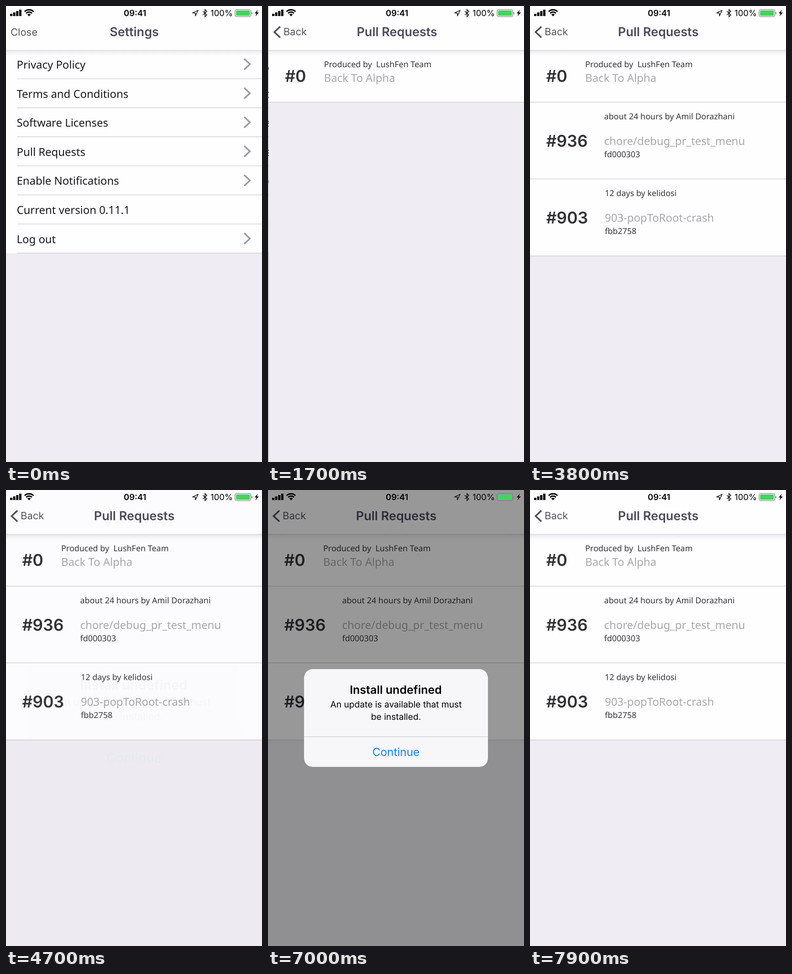
Recreate the animation shown at these times as an HTML page. Size 561 by 998 pixels, loop 8 s.

```html
<!DOCTYPE html>
<html lang="en">
<head>
<meta charset="utf-8">
<title>Settings to pull requests</title>
<style>
html, body { margin: 0; width: 100%; height: 100%; overflow: hidden; background: #efedf3; }
svg { display: block; }
text { font-family: "Noto Sans", sans-serif; white-space: pre; text-rendering: geometricPrecision; }
.ui { font-family: Inter, sans-serif; }
.bold { font-weight: 600; }
.mid { text-anchor: middle; }
.title { font-size: 27px; fill: #4b4a5c; }
.nav { font-size: 22px; fill: #55545f; }
.item { font-size: 23.9px; fill: #19181a; }
.number { font-size: 35.5px; fill: #333136; }
.meta { font-size: 17.95px; fill: #353437; }
.branch { font-size: 23.9px; fill: #a9a8ab; }
.status { font-size: 18.4px; }
.line { stroke: #d2d1d5; stroke-width: 1.4; }
.chevron { fill: none; stroke: #9d9ca1; stroke-width: 3.6; }
</style>
</head>
<body>
<svg width="561" height="998" viewBox="0 0 561 998">
  <defs>
    <linearGradient id="below" x2="0" y2="1">
      <stop stop-opacity=".11"/><stop offset=".4" stop-opacity=".045"/><stop offset="1" stop-opacity="0"/>
    </linearGradient>
    <linearGradient id="beside">
      <stop stop-opacity="0"/><stop offset="1" stop-opacity=".2"/>
    </linearGradient>
  </defs>

  <g id="settings"></g>
  <rect id="shade" width="561" height="998"/>

  <g id="pulls">
    <rect x="-11" width="11" height="998" fill="url(#beside)"/>
    <rect width="561" height="998" fill="#fdfdfe"/>
    <g id="content"></g>
  </g>

  <rect id="dim" width="561" height="998"/>

  <g id="alert">
    <rect x="79" y="392" width="403" height="214" rx="19" fill="#f7f6f9"/>
    <path d="M79 540H482" stroke="#d3d2d7" stroke-width="1.3"/>
    <g id="message" class="mid">
      <text class="ui bold" x="280" y="446" font-size="25">Install undefined</text>
      <text class="ui" x="280.5" y="476" font-size="19.2">An update is available that must</text>
      <text class="ui" x="280.5" y="503" font-size="19.2">be installed.</text>
      <text class="ui" x="280.5" y="582" font-size="24.3" fill="#0f7ff5">Continue</text>
    </g>
  </g>

  <g id="statusbar">
    <path d="M9 17h5v5h-5zM15.6 14h5v8h-5zM22.2 11h5v11h-5zM28.8 8h5v14h-5z"/>
    <path d="M50.5 22.5L46.6 18.6A5.5 5.5 0 0 1 54.4 18.6Z"/>
    <path d="M44.2 15.9A9 9 0 0 1 56.8 15.9M40.8 12.3A13.8 13.8 0 0 1 60.2 12.3" fill="none" stroke="#000" stroke-width="3"/>
    <text class="ui bold mid status" x="282.7" y="22">09:41</text>
    <path d="M421 9.3L409 15.2L414.8 15.6L415.2 21.6Z" fill="none" stroke="#111" stroke-width="1.5" stroke-linejoin="round"/>
    <path d="M431.3 11.5L440.2 19.3L436 23.3V7.7L440.2 11.7L431.3 19.5" fill="none" stroke="#111" stroke-width="1.5"/>
    <text class="ui status" x="497" y="22" text-anchor="end">100%</text>
    <rect x="502" y="7.5" width="34.5" height="16" rx="4" fill="none" stroke="#77777a" stroke-width="1.2"/>
    <rect x="504" y="9.5" width="30.5" height="12" rx="2" fill="#46d35f"/>
    <path d="M538 13q2 .5 2 2.5t-2 2.5z" fill="#77777a"/>
    <path d="M552 8L545 16.3H549L546.8 22.5L554 14.2H549.8Z"/>
  </g>
</svg>

<script>
const LOOP = 8000, FRAME = 100, WIDTH = 561;
const $ = id => document.getElementById(id);

const text = (cls, x, y, s) => `<text class="${cls}" x="${x}" y="${y}">${s}</text>`;
const line = (x, y) => `<path class="line" d="M${x} ${y}H${WIDTH}"/>`;
const white = (y, h) => `<rect y="${y}" width="${WIDTH}" height="${h}" fill="#fefdff"/>`;
const header = title => white(0, 96) +
  `<rect y="96" width="${WIDTH}" height="14" fill="url(#below)"/>` +
  text("ui bold mid title", 281, 66, title);
const page = `<rect width="${WIDTH}" height="998" fill="#efedf3"/>`;

function settingsPage() {
  const items = ["Privacy Policy", "Terms and Conditions", "Software Licenses", "Pull Requests",
    "Enable Notifications", "Current version 0.11.1", "Log out"];
  const rows = items.map((label, i) => {
    const y = 95.5 + 63.6 * i;
    const arrow = label.startsWith("Current") ? "" :
      `<path class="chevron" d="M522 ${y + 20}L534.5 ${y + 31.8}L522 ${y + 43.6}"/>`;
    return text("item", 23.5, y + 41.5, label) + arrow + line(24, y + 63.6);
  });
  return page + white(95, 446) + rows.join("") + header("Settings") + text("ui nav", 10, 64.5, "Close");
}

// The row's rule straddles its bottom edge, so the fill starts just below the previous rule.
function pullRow(top, height, number, x, when, branch, commit) {
  const shift = commit ? 23.5 : 0;
  return white(top + 0.7, height - 0.7) + line(0, top + height) +
    text("ui bold number", 35.5, top + (commit ? 97 : 69.5), number) +
    text("meta", x, top + 37.5, when) +
    text("branch", x, top + 69.5 + shift, branch) +
    (commit ? text("meta", x, top + 120, commit) : "");
}

function pullsPage() {
  const first = pullRow(96, 114.5, "#0", 121, "Produced by  LushFen Team", "Back To Alpha");
  const loaded =
    pullRow(210.5, 168, "#936", 162.5, "about 24 hours by Amil Dorazhani", "chore/debug_pr_test_menu", "fd000303") +
    pullRow(378.5, 168.5, "#903", 164, "12 days by kelidosi", "903-popToRoot-crash", "fbb2758");
  return page + `<g id="loaded">${loaded}</g>` + first + header("Pull Requests") +
    `<path class="chevron" style="stroke:#4f4e5b" d="M25 45L12.3 57L25 69"/>` +
    text("ui nav", 32, 64, "Back");
}

$("settings").innerHTML = settingsPage();
$("content").innerHTML = pullsPage();

// Critically damped spring: 1 before the start, easing to 0.
function remaining(t, start, rate) {
  const p = Math.max(0, t - start) / 1000 * rate;
  return (1 + p) * Math.exp(-p);
}
const show = (id, on) => $(id).setAttribute("display", on ? "inline" : "none");
const fade = (id, v) => $(id).setAttribute("opacity", v.toFixed(4));
const move = (id, x) => $(id).setAttribute("transform", `translate(${x.toFixed(2)})`);

function draw(t) {
  const left = t < 1900 ? remaining(t, 1261, 18.26) : 0;
  move("settings", -0.3 * WIDTH * (1 - left));
  move("pulls", WIDTH * left);
  fade("shade", 0.1 * (1 - left));
  show("pulls", left < 1);
  show("content", t >= 1400);
  show("loaded", t >= 1800);

  const entering = remaining(t, 4690, 22.85);
  const staying = remaining(t, 7004, 22.85);
  const scale = 1 + 0.17 * entering;
  fade("dim", 0.4 * (1 - entering) * staying);
  fade("alert", (1 - entering) * staying ** 0.6);
  fade("message", staying ** 0.25);
  $("alert").setAttribute("transform", `translate(280.5 499) scale(${scale}) translate(-280.5 -499)`);
}

function tick() {
  draw(Math.floor(performance.now() % LOOP / FRAME) * FRAME);
  requestAnimationFrame(tick);
}
tick();
</script>
</body>
</html>
```
